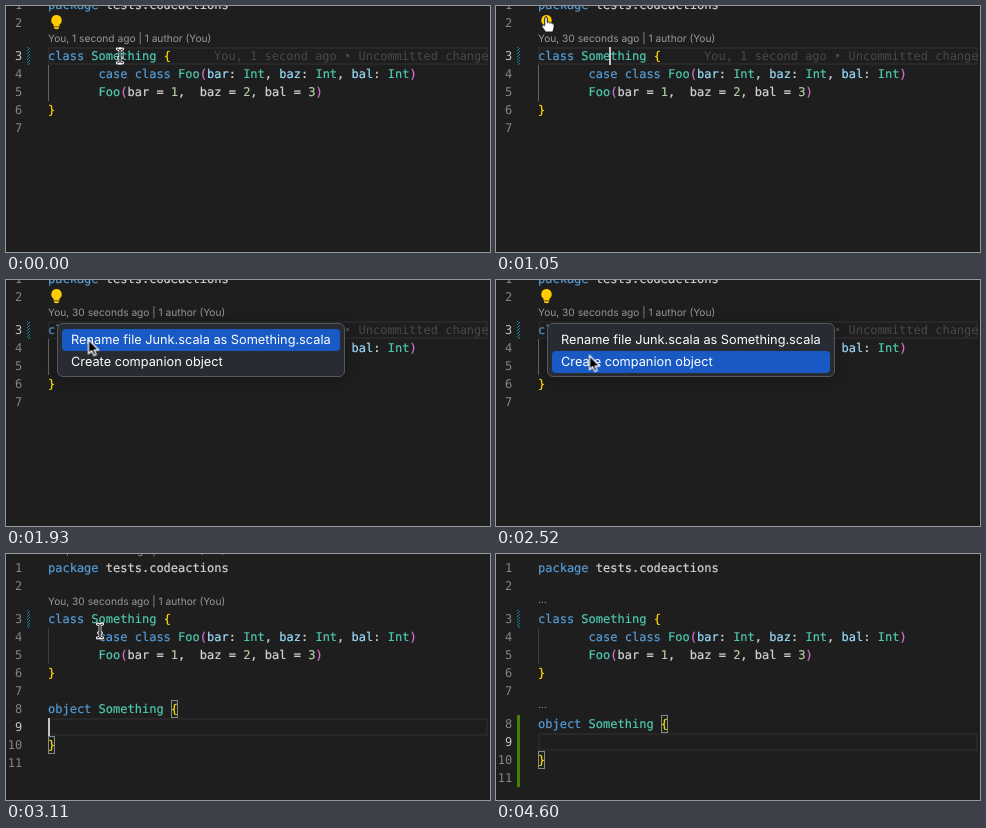
An HTML page that plays this animation: 484 px wide and 246 px high, repeating every 4900 ms.

```html
<!DOCTYPE html>
<html lang="en">
<head>
<meta charset="utf-8">
<title>Create companion object</title>
<style>
html, body { margin: 0; width: 100%; height: 100%; overflow: hidden; background: #1e1e1e; }
#stage { position: absolute; left: 0; top: 0; width: 484px; height: 246px; overflow: hidden;
  background: #1e1e1e; color: #d4d4d4; text-rendering: geometricPrecision;
  font: 12px/18px "DejaVu Sans Mono", "Liberation Mono", monospace; }
#doc, #tail { position: absolute; left: 0; top: 0; width: 482px; height: 300px; }
#stage svg { position: absolute; left: 0; top: 0; overflow: visible; }

/* every timed element steps through the same loop */
.t { animation: 4.9s step-end infinite; }

/* editor */
.row, .lens, .abs { position: absolute; top: calc(var(--y) * 1px); white-space: pre; }
.row { left: 42px; height: 18px; -webkit-text-stroke: .2px; }
.num { position: absolute; left: -42px; width: 16.3px; text-align: right; color: #858585; -webkit-text-stroke: 0; }
.on { color: #c6c6c6; }
.lens { left: 42px; font: 10.2px/15px Inter, "Open Sans", sans-serif; color: #999; }
.k { color: #569cd6; }
.c { color: #4ec9b0; }
.p { color: #9cdcfe; }
.n { color: #b5cea8; }
.g { color: #ffd700; }
.o { color: #da70d6; }
.match { display: inline-block; height: 18px; background: #0064001a; box-shadow: inset 0 0 0 1px #888; }
.ghost { left: 208px; width: 274px; overflow: hidden; color: #494949; }
.current { left: 42px; width: 440px; height: 18px; box-sizing: border-box; border: 2px solid #282828; }
.caret { width: 2px; height: 18px; background: #c4c5c3; }
.guide { left: 42px; width: 1px; height: 36px; background: #404040; }
.edited { left: 20.5px; width: 3px; height: 18px;
  background: linear-gradient(-45deg, #0000 25%, #1b81a8 25% 50%, #0000 50% 75%, #1b81a8 75%) 0 0 / 3px 3px; }
.added { left: 21px; width: 3px; height: 72px; background: #487e02; }

/* popup */
#menu { position: absolute; left: 51px; top: 43px; width: 288px; height: 54px; box-sizing: border-box;
  border: 1px solid #54575c; border-radius: 6px; background: #282b31; box-shadow: 0 1px 16px #0005;
  font: 12.75px/22px Inter, "Open Sans", sans-serif; color: #fff; animation-name: menu; }
#menu div { position: absolute; left: 13px; white-space: pre; }
#menu #pick { left: 4px; top: 4.5px; width: 278px; height: 22px; border-radius: 4px; background: #1859c4; animation-name: pick; }

#doc { animation-name: scroll; }
#tail { animation-name: tail; }
.before { animation-name: before; }
#num3 { animation-name: num3; }
#guide { animation-name: guide; }
#fresh { animation-name: fresh; }
#older { animation-name: older; }
.dots { animation-name: dots; }
#top { animation-name: top; }
#added { animation-name: added; }
#caret3 { animation-name: caret3; }
#caret9 { animation-name: caret9; }
#mouse { animation-name: mouse; }
#beam { animation-name: beam; }
#hand { animation-name: hand; }
#arrow { animation-name: arrow; }

@keyframes scroll { 0% { transform: translateY(-15px) } 63.46%, 100% { transform: none } }
@keyframes tail {
  0% { opacity: 0; transform: none }
  63.46% { opacity: 1; transform: none }
  66.53%, 100% { opacity: 1; transform: translateY(15px) }
}
@keyframes before { 0% { opacity: 1 } 63.46%, 100% { opacity: 0 } }
@keyframes num3 { 0% { color: #c6c6c6 } 63.46%, 100% { color: #858585 } }
@keyframes guide { 0% { background: #636363 } 63.46%, 100% { background: #404040 } }
@keyframes fresh { 0% { opacity: 1 } 12.24%, 100% { opacity: 0 } }
@keyframes older { 0% { opacity: 0 } 12.24% { opacity: 1 } 72.65%, 100% { opacity: 0 } }
@keyframes dots { 0% { opacity: 0 } 72.65%, 100% { opacity: 1 } }
@keyframes top { 0% { opacity: 1 } 72.65%, 100% { opacity: 0 } }
@keyframes added { 0% { opacity: 0 } 66.53%, 100% { opacity: 1 } }
@keyframes caret3 {
  0%, 21.42%, 42.44% { opacity: 1 }
  12.24%, 30.4%, 51.42%, 100% { opacity: 0 }
}
@keyframes caret9 {
  0%, 81.83% { opacity: 1 }
  72.65%, 93.87%, 100% { opacity: 0 }
}
@keyframes menu { 0% { opacity: 0 } 27.55% { opacity: 1 } 57.55% { opacity: .6 } 60.4%, 100% { opacity: 0 } }
@keyframes pick { 0% { transform: none } 42.44%, 100% { transform: translateY(22px) } }
@keyframes mouse {
  0% { transform: translate(114px, 50px) }
  9.18% { transform: translate(105px, 45.5px) }
  12.24% { transform: translate(52px, 14px) }
  15.3% { transform: translate(50px, 11.5px) }
  27.55% { transform: translate(49px, 9px) }
  30.4% { transform: translate(48.5px, 10px) }
  33.46% { transform: translate(56px, 26px) }
  36.53% { transform: translate(66px, 37.5px) }
  39.38% { transform: translate(82.5px, 59.5px) }
  42.44% { transform: translate(90px, 71px) }
  45.51% { transform: translate(91px, 73px) }
  48.36% { transform: translate(93.5px, 75.5px) }
  63.46% { transform: translate(94px, 77px) }
  84.89%, 100% { transform: translate(123.5px, 99px) }
}
@keyframes beam { 0%, 63.46% { opacity: 1 } 12.24%, 87.75%, 100% { opacity: 0 } }
@keyframes hand { 0%, 27.55%, 100% { opacity: 0 } 12.24% { opacity: 1 } }
@keyframes arrow { 0%, 63.46%, 100% { opacity: 0 } 27.55% { opacity: 1 } }
</style>
</head>
<body>
<div id="stage">
  <div id="doc" class="t">
    <div class="abs current t before" style="--y:56"></div>
    <div class="abs edited" style="--y:56"></div>
    <div class="abs guide t" id="guide" style="--y:74"></div>

    <div class="lens t" id="top" style="--y:-10">You, 30 seconds ago | 1 author (You)</div>
    <div class="row" style="--y:5"><span class="num">1</span><span class="k">package</span> tests.codeactions</div>
    <div class="row" style="--y:23"><span class="num">2</span></div>
    <div class="lens t" id="fresh" style="--y:41">You, 1 second ago | 1 author (You)</div>
    <div class="lens t" id="older" style="--y:41">You, 30 seconds ago | 1 author (You)</div>
    <div class="lens t dots" style="--y:39">…</div>
    <div class="row" style="--y:56"><span class="num t" id="num3">3</span><span class="k">class</span> <span class="c">Something</span> <span class="g">{</span></div>
    <div class="row" style="--y:74"><span class="num">4</span>       <span class="k">case class</span> <span class="c">Foo</span><span class="o">(</span><span class="p">bar</span>: <span class="c">Int</span>, <span class="p">baz</span>: <span class="c">Int</span>, <span class="p">bal</span>: <span class="c">Int</span><span class="o">)</span></div>
    <div class="row" style="--y:92"><span class="num">5</span>       <span class="c">Foo</span><span class="o">(</span>bar = <span class="n">1</span>,  baz = <span class="n">2</span>, bal = <span class="n">3</span><span class="o">)</span></div>
    <div class="row" style="--y:110"><span class="num">6</span><span class="g">}</span></div>
    <div class="row" style="--y:128"><span class="num">7</span></div>
    <div class="abs ghost t before" style="--y:56">You, 1 second ago • Uncommitted changes</div>
    <div class="abs caret t" id="caret3" style="--y:56;left:113px"></div>

    <svg class="t before" width="484" height="246">
      <path d="M50.5 24a5.3 5.3 0 0 0-3 9.6v1.9h6v-1.9a5.3 5.3 0 0 0-3-9.6Z" fill="#fc0"/>
      <path d="M48 36.3h5v1.2q-2.5 1.6-5 0Z" fill="#fc0"/>
    </svg>

    <div id="tail" class="t">
      <div class="abs current" style="--y:164"></div>
      <div class="abs added t" id="added" style="--y:146"></div>
      <div class="lens t dots" style="--y:129">…</div>
      <div class="row" style="--y:146"><span class="num">8</span><span class="k">object</span> <span class="c">Something</span> <span class="g match">{</span></div>
      <div class="row" style="--y:164"><span class="num on">9</span></div>
      <div class="row" style="--y:182"><span class="num">10</span><span class="g match">}</span></div>
      <div class="row" style="--y:200"><span class="num">11</span></div>
      <div class="abs caret t" id="caret9" style="--y:164;left:42px"></div>
    </div>
  </div>

  <div id="menu" class="t">
    <div id="pick" class="t"></div>
    <div style="top:5.5px">Rename file Junk.scala as Something.scala</div>
    <div style="top:27.5px">Create companion object</div>
  </div>

  <svg width="484" height="246">
    <defs><path id="bar" d="M-2.8-7Q0-7 0-5V5Q0 7-2.8 7M2.8-7Q0-7 0-5V5Q0 7 2.8 7M-1.5 2H1.5"/></defs>
    <g id="mouse" class="t">
      <g id="beam" class="t" fill="none" stroke-linecap="round">
        <use href="#bar" stroke="#fff" stroke-width="2.8"/>
        <use href="#bar" stroke="#111" stroke-width=".9"/>
      </g>
      <path id="hand" class="t" fill="#fff" stroke="#000" stroke-width=".9" stroke-linejoin="round"
        d="M-1.3 8V1a1.3 1.3 0 0 1 2.6 0V5.2c.6-.9 2.2-.7 2.5.3 .7-.7 2.1-.4 2.3.6 .8-.5 2 0 2 1.2V10c0 2-1.2 3-1.4 4.6H-.3C-1 13-3 11.4-4 9.4c-.8-1.5.9-2.4 1.8-1.3Z"/>
      <path id="arrow" class="t" fill="#000" stroke="#fff" stroke-width="1.25" stroke-linejoin="round"
        d="M0 0V14.3L3.2 11.3L5.4 16L7.7 15L5.6 10.5H10.2Z"/>
    </g>
  </svg>
</div>
</body>
</html>
```
